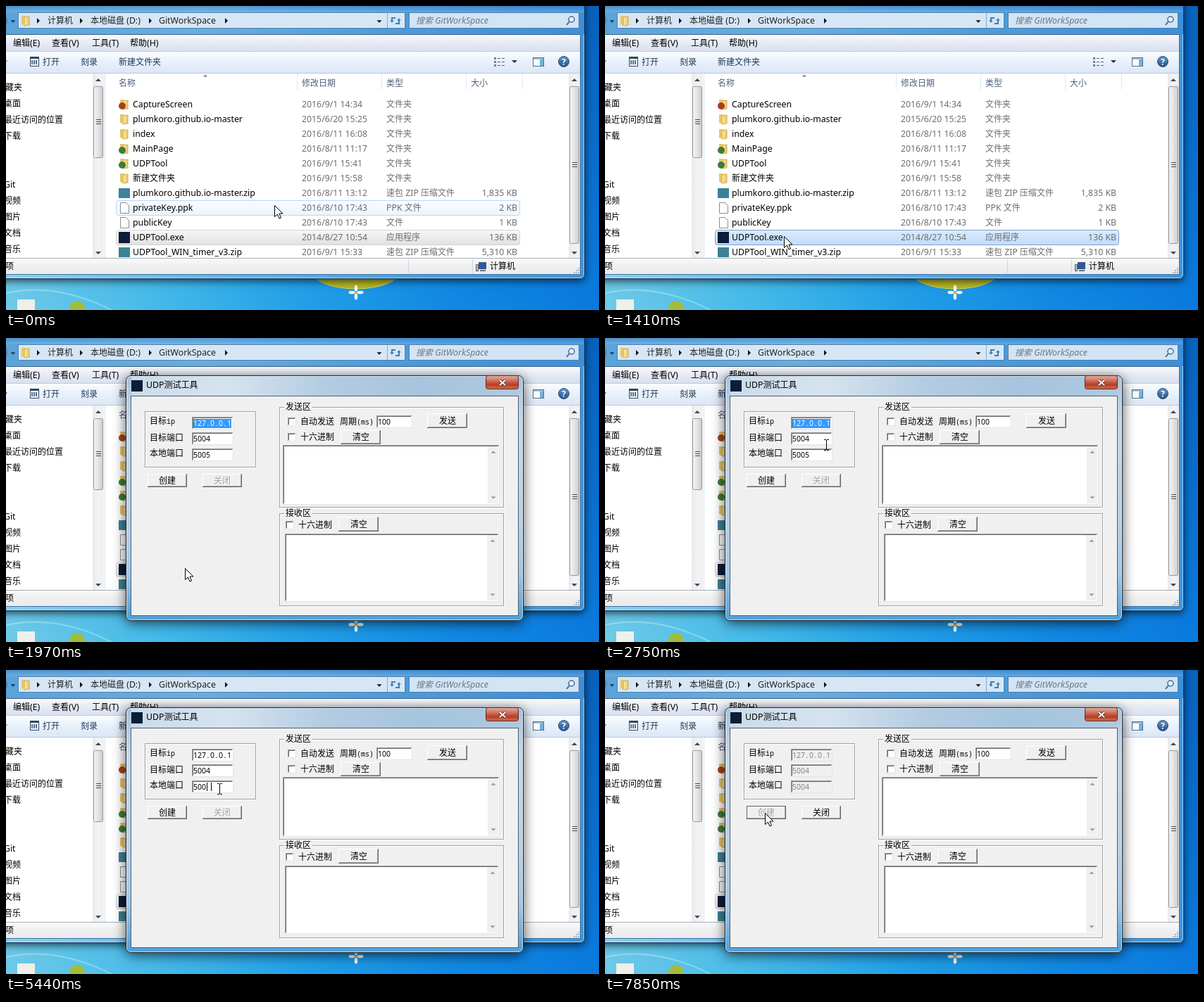
These frames come from a looping animation (842x432 px, 8 s). An HTML page with a canvas:

```html
<!DOCTYPE html>
<html lang="zh">
<head>
<meta charset="utf-8">
<style>
html, body { margin: 0; width: 842px; height: 432px; overflow: hidden; background: #1b86dd; }
canvas { display: block; }
</style>
</head>
<body>
<canvas id="stage" width="842" height="432"></canvas>
<script>
const ctx = document.getElementById('stage').getContext('2d');
const LOOP = 8000, DIALOG_AT = 1970, CREATED_AT = 7850;
const CJK = '"Noto Sans CJK SC", "Noto Sans CJK", sans-serif';

// ---------- drawing helpers ----------
function shade(x0, y0, x1, y1, colors) {
  const g = ctx.createLinearGradient(x0, y0, x1, y1);
  colors.forEach((c, i) => g.addColorStop(i / (colors.length - 1), c));
  return g;
}
const down = (y, h, ...colors) => shade(0, y, 0, y + h, colors);
const across = (x, w, ...colors) => shade(x, 0, x + w, 0, colors);

function rect(x, y, w, h, fill, stroke) {
  if (fill) { ctx.fillStyle = fill; ctx.fillRect(x, y, w, h); }
  if (stroke) { ctx.strokeStyle = stroke; ctx.lineWidth = 1; ctx.strokeRect(x + .5, y + .5, w - 1, h - 1); }
}
function round(x, y, w, h, r, fill, stroke) {
  ctx.beginPath();
  ctx.roundRect(x + .5, y + .5, w - 1, h - 1, r);
  paint(fill, stroke);
}
function paint(fill, stroke, width = 1) {
  if (fill) { ctx.fillStyle = fill; ctx.fill(); }
  if (stroke) { ctx.strokeStyle = stroke; ctx.lineWidth = width; ctx.stroke(); }
}
function shape(points, fill, stroke, width) {
  ctx.beginPath();
  points.forEach(([x, y]) => ctx.lineTo(x, y));
  if (fill) ctx.closePath();
  paint(fill, stroke, width);
}
function ellipse(x, y, rx, ry, fill, stroke, width) {
  ctx.beginPath();
  ctx.ellipse(x, y, rx, ry, 0, 0, 7);
  paint(fill, stroke, width);
}
function arrow(x, y, dir, size, color) {
  const [dx, dy] = { up: [0, -1], down: [0, 1], right: [1, 0] }[dir];
  shape([[x + dx * size / 2, y + dy * size / 2],
         [x - dx * size / 2 + dy * size, y - dy * size / 2 + dx * size],
         [x - dx * size / 2 - dy * size, y - dy * size / 2 - dx * size]], color);
}
// Chinese and Latin runs use their own fonts; y is the middle of the line.
function text(str, x, y, color = '#000', { mono, italic, right } = {}) {
  const latin = mono ? '10px "Noto Sans Mono", monospace' : '12.3px "Noto Sans", sans-serif';
  const runs = str.match(/[\u3000-\u9fff]+|[^\u3000-\u9fff]+/g).map(run => {
    const font = (italic ? 'italic ' : '') + (run > '\u3000' ? '12px ' + CJK : latin);
    ctx.font = font;
    return { run, font, width: ctx.measureText(run).width };
  });
  if (right) x -= runs.reduce((sum, r) => sum + r.width, 0);
  ctx.fillStyle = color;
  for (const { run, font, width } of runs) {
    ctx.font = font;
    ctx.fillText(run, x, y + 4);
    x += width;
  }
}
// Numbers sit in fixed cells, six pixels per character.
function digits(value, x, y, color) {
  ctx.font = '10.5px "Noto Sans", sans-serif';
  ctx.fillStyle = color;
  ctx.textAlign = 'center';
  [...value].forEach((c, i) => ctx.fillText(c, x + 3 + i * 6, y + 4));
  ctx.textAlign = 'left';
}
function withShadow(blur, dy, draw) {
  ctx.save();
  ctx.shadowColor = 'rgba(0,0,0,.7)';
  ctx.shadowBlur = blur;
  ctx.shadowOffsetY = dy;
  draw();
  ctx.restore();
}

// ---------- desktop ----------
function desktop() {
  rect(0, 0, 842, 432, across(0, 842, '#6fcbe9', '#45bbea', '#22a0e8', '#1189e3', '#0a7ade'));
  rect(0, 0, 842, 432, down(0, 432, 'rgba(0,40,110,.3)', 'rgba(0,40,110,0)'));
  ctx.beginPath();
  ctx.moveTo(0, 408);
  ctx.quadraticCurveTo(70, 392, 150, 432);
  paint(null, 'rgba(200,245,240,.4)', 2);
  ellipse(497, 377, 62, 25, '#b5b524', '#d6d24a');
  for (const [dx, dy] of [[0, -6], [0, 6], [-6, 0], [6, 0]])
    ellipse(497 + dx, 407 + dy, dx ? 4.5 : 2.3, dx ? 2.3 : 4.5, '#f6fbf4');
  ellipse(497, 407, 2, 2, '#e5a84c');
  rect(16, 417, 25, 15, '#eef0ea');
  ellipse(101, 430, 11, 11, '#a3bb3c');
}

// ---------- file manager ----------
const files = [
  ['folder', 'CaptureScreen', '2016/9/1 14:34', '文件夹', '', '#a5401c'],
  ['folder', 'plumkoro.github.io-master', '2015/6/20 15:25', '文件夹'],
  ['folder', 'index', '2016/8/11 16:08', '文件夹'],
  ['folder', 'MainPage', '2016/8/11 11:17', '文件夹', '', '#3c7d35'],
  ['folder', 'UDPTool', '2016/9/1 15:41', '文件夹', '', '#3c7d35'],
  ['folder', '新建文件夹', '2016/9/1 15:58', '文件夹'],
  ['zip', 'plumkoro.github.io-master.zip', '2016/8/11 13:12', '速包 ZIP 压缩文件', '1,835 KB'],
  ['page', 'privateKey.ppk', '2016/8/10 17:43', 'PPK 文件', '2 KB'],
  ['page', 'publicKey', '2016/8/10 17:43', '文件', '1 KB'],
  ['app', 'UDPTool.exe', '2014/8/27 10:54', '应用程序', '136 KB'],
  ['zip', 'UDPTool_WIN_timer_v3.zip', '2016/9/1 15:33', '速包 ZIP 压缩文件', '5,310 KB'],
];
const EXE = 9;
const icons = {
  folder(x, y) {
    shape([[x + 2, y - 7], [x + 8, y - 7], [x + 8, y + 7], [x + 2, y + 5]], '#e9c766');
    shape([[x + 6, y - 5], [x + 13, y - 6], [x + 13, y + 6], [x + 6, y + 7]],
          across(x + 5, 9, '#fdf0b5', '#e8c25c'), '#d2ab4e');
  },
  zip: (x, y) => rect(x, y - 7, 16, 14, '#3c8297'),
  page: (x, y) => shape([[x + 2.5, y - 7.5], [x + 10.5, y - 7.5], [x + 14.5, y - 3.5], [x + 14.5, y + 7.5],
                         [x + 2.5, y + 7.5], [x + 2.5, y - 7.5]], '#fdfdfd', '#8d8d8d'),
  app: (x, y) => rect(x, y - 8, 16, 16, '#0b1d38'),
};
const rowStyles = {
  hover: ['#fafdff', '#ebf4fd', '#b8d6fb'],
  selected: ['#dcebfc', '#c1dbfc', '#7da2ce'],
  idle: ['#f8f8f8', '#e0e0e0', '#d4d4d4'],
};
const rowY = i => 140 + 21 * i;

function scrollbar(x, thumbEnd, grip) {
  rect(x, 96, 16, 262, across(x, 16, '#e8e9ec', '#f3f3f4', '#efeff0'));
  arrow(x + 8, 105, 'up', 4, '#404855');
  arrow(x + 8, 351, 'down', 4, '#404855');
  round(x + 1, 114, 14, thumbEnd - 114, 2, across(x, 15, '#f6f6f6', '#e6e6e8', '#c9cacd'), '#979797');
  for (let i = -1; i < 2; i++) rect(x + 5, grip + i * 3, 7, 1, '#4a4a4a');
}

function fileRow(file, i, style) {
  const [kind, name, date, type, size, badge] = file, y = rowY(i);
  if (style) {
    const [top, bottom, edge] = rowStyles[style];
    round(156, y - 11, 574, 22, 3, down(y - 11, 22, top, bottom), edge);
  }
  icons[kind](160, y);
  if (badge) ellipse(165, y + 2, 5, 5, badge);
  text(name, 180, y);
  text(date, 420, y, '#6d6d6d');
  text(type, 540, y, '#6d6d6d');
  if (size) text(size, 726, y, '#6d6d6d', { right: true });
}

function addressBar() {
  rect(0, 0, 821, 40, across(0, 821, '#5aa4da', '#69aee0', '#4c9cdd', '#3a8fdb'));
  rect(0, 0, 821, 9, down(0, 9, 'rgba(30,100,170,.3)', 'rgba(160,205,240,.25)'));
  arrow(10, 22, 'down', 3.5, '#1d3a58');
  ellipse(-3, 21, 5, 9, '#4f83b8');
  rect(17, 9, 550, 23, '#d6e6f5', '#527fa9');
  rect(18, 10, 548, 21, null, '#e6f1fa');
  rect(541, 10, 1, 21, '#8fa9c3');
  icons.folder(20, 21);
  for (const x of [46, 107, 205, 313]) arrow(x, 21, 'right', 4, '#111');
  text('计算机', 59, 21, '#222');
  text('本地磁盘 (D:)', 120, 21, '#222');
  text('GitWorkSpace', 217, 21, '#222');
  arrow(530, 22, 'down', 3.5, '#111');
  shape([[548, 23], [548, 17], [553, 17]], null, '#3480bd', 2);
  shape([[558, 18], [558, 25], [553, 25]], null, '#3480bd', 2);
  arrow(548, 22, 'down', 3, '#3480bd');
  arrow(558, 19, 'up', 3, '#3480bd');
  rect(572, 9, 242, 23, '#d3e4f4', '#527fa9');
  text('搜索 GitWorkSpace', 582, 21, '#6a7886', { italic: true });
  ellipse(803, 19, 4, 4, '#edf5fb', '#3b6c9e', 1.5);
  shape([[800, 22], [796, 27]], null, '#3b6c9e', 2);
}

function bars() {
  rect(0, 40, 815, 1, '#3f6286');
  rect(0, 41, 815, 23, down(41, 23, '#fafbfd', '#e6eaf4', '#d9e0ef'));
  [['编辑(E)', 10], ['查看(V)', 65], ['工具(T)', 122], ['帮助(H)', 176]].forEach(([s, x]) => text(s, x, 53));
  rect(0, 64, 815, 32, down(64, 32, '#fbfdff', '#e8f0fa', '#dbe6f4'));
  rect(0, 64, 815, 1, '#c3cbdc');
  rect(0, 95, 815, 1, '#b9c9dc');
  arrow(-1, 79, 'down', 3, '#1e395b');
  rect(34, 72, 13, 14, '#f8fafc', '#31475f');
  rect(34, 72, 13, 3, '#31475f');
  for (let i = 0; i < 3; i++) rect(36 + i * 3, 77, 2, 6, '#567493');
  [['打开', 52], ['刻录', 106], ['新建文件夹', 160]].forEach(([s, x]) => text(s, x, 80, '#1e395b'));
  for (let i = 0; i < 3; i++) {
    rect(693, 73 + i * 5, 3, 3, '#69829f');
    rect(698, 74 + i * 5, 4, 1, '#53667c');
    rect(704, 74 + i * 5, 4, 1, '#53667c');
  }
  arrow(722, 79, 'down', 4, '#1e395b');
  rect(748, 73, 16, 13, '#fff', '#49718f');
  rect(749, 74, 14, 2, '#9cc2dc');
  rect(758, 76, 5, 9, '#73b1d9');
  ellipse(792, 79, 7.5, 7.5, down(71, 16, '#6c9ad0', '#1f4b8c'), '#33506f');
  ctx.font = 'bold 12px "Noto Sans", sans-serif';
  ctx.fillStyle = '#fff';
  ctx.fillText('?', 789.3, 83.5);
}

function sidebar() {
  text('收藏夹', -13, 116);
  [['桌面', 139], ['最近访问的位置', 162], ['下载', 185], ['视频', 277], ['图片', 300], ['文档', 323], ['音乐', 346]]
    .forEach(([s, y]) => text(s, -3, y));
  text('Git', -3, 254);
  scrollbar(123, 216, 164);
  rect(140, 96, 1, 262, '#d9e3ef');
}

function statusBar() {
  rect(0, 358, 815, 23, down(358, 23, '#fafafa', '#f0f0f0', '#e9ebee'));
  rect(0, 358, 815, 1, '#9fabb8');
  text('项', -1, 370);
  rect(571, 360, 1, 20, '#d0d3d8');
  rect(662, 360, 1, 20, '#d0d3d8');
  rect(671, 364, 11, 10, '#2559b1', '#4a5562');
  rect(667, 367, 4, 10, '#b5bcc6', '#5b6572');
  rect(673, 375, 8, 2, '#68727f');
  text('计算机', 687, 370);
  for (let i = 0; i < 3; i++) for (let j = 0; j <= i; j++) rect(812 - j * 3, 372 + i * 3, 2, 2, '#a9b4c2');
}

function explorer(hovered, exeStyle) {
  withShadow(12, 3, () => round(-20, -20, 842, 408, 6, '#4ba2e4'));
  round(-20, -20, 842, 408, 6, across(0, 822, '#8bd3ee', '#62b9ea', '#48a3e6', '#3f97e0'), '#12365c');
  round(-19, -19, 840, 406, 5, null, 'rgba(200,232,252,.7)');
  addressBar();
  rect(0, 40, 815, 341, '#fff');
  bars();
  sidebar();
  for (const x of [413, 533, 653, 733]) rect(x, 96, 1, 23, '#e2e8ee');
  [['名称', 160], ['修改日期', 420], ['类型', 540], ['大小', 660]].forEach(([s, x]) => text(s, x, 110, '#4c607a'));
  arrow(283, 99, 'up', 3, '#5c87a8');
  files.forEach((file, i) => fileRow(file, i, i === EXE ? exeStyle : i === hovered && 'hover'));
  scrollbar(799, 338, 225);
  statusBar();
  rect(815, 40, 1, 342, '#3f6f9c');
  rect(0, 381, 816, 1, '#3f6f9c');
}

// ---------- dialog ----------
const FIELD_TOPS = [112, 134, 157];
const mono = (s, x, y, color) => text(s, x, y, color, { mono: true });

function sunken(x, y, w, h, fill = '#fff') {
  rect(x, y, w, h, fill, '#e3e3e3');
  rect(x, y, w - 1, 1, '#a0a0a0');
  rect(x, y, 1, h - 1, '#a0a0a0');
  rect(x + 1, y + 1, w - 3, 1, '#696969');
  rect(x + 1, y + 1, 1, h - 3, '#696969');
}
function button(label, x, y, w, h, { disabled, pressed, framed } = {}) {
  rect(x, y, w, h, '#f0f0f0');
  rect(x, y, w, 1, pressed ? '#8a8a8a' : '#fff');
  rect(x, y, 1, h, pressed ? '#8a8a8a' : '#fff');
  rect(x, y + h - 1, w, 1, '#696969');
  rect(x + w - 1, y, 1, h, '#696969');
  rect(x + 1, y + h - 2, w - 2, 1, '#a0a0a0');
  rect(x + w - 2, y + 1, 1, h - 2, '#a0a0a0');
  if (framed) rect(x, y, w, h, null, '#646464');
  const shift = pressed ? 1 : 0;
  const tx = Math.round(x + w / 2 - 12) + shift, ty = Math.round(y + h / 2) + shift;
  if (disabled) text(label, tx + 1, ty + 1, '#fff');
  text(label, tx, ty, disabled ? '#a0a0a0' : '#000');
}
function group(x, y, w, h, label) {
  rect(x + 1, y + 1, w, h, null, '#fff');
  rect(x, y, w, h, null, '#a0a0a0');
  if (label) {
    rect(x + 7, y - 5, 40, 11, '#f0f0f0');
    text(label, x + 9, y);
  }
}
function checkbox(label, x, y) {
  sunken(x, y, 12, 12);
  text(label, x + 18, y + 6);
}
function textArea(x, y, w, h) {
  sunken(x, y, w, h);
  rect(x + w - 17, y + 2, 15, h - 4, '#f0f0f0');
  arrow(x + w - 9, y + 10, 'up', 3.5, '#9b9b9b');
  arrow(x + w - 9, y + h - 10, 'down', 3.5, '#9b9b9b');
}

function connection(t) {
  const created = t >= CREATED_AT, fresh = t < 3720;
  const port = t < 5440 ? '5005' : t < 6430 ? '500' : '5004';
  const ink = created ? '#848484' : '#000';
  group(197, 104, 158, 80);
  ['目标ip', '目标端口', '本地端口'].forEach((s, i) => mono(s, 204, [118, 142, 164][i]));
  ['127.0.0.1', '5004', port].forEach((value, i) => {
    const y = FIELD_TOPS[i], marked = i === 0 && fresh;
    sunken(264, y, 59, 18, created ? '#f0f0f0' : '#fff');
    if (marked) rect(266, y + 3, 54, 13, '#3399ff');
    digits(value, 266, y + 9, marked ? '#fff' : ink);
  });
  // The caret leaves its earlier position on screen while the digit is replaced.
  if (!fresh && !created) {
    rect(291, 160, 1, 12, '#000');
    if (t >= 5440) rect(285, 160, 1, 12, '#000');
  }
  button('创建', 201, 193, 56, 19, { disabled: created, pressed: t >= 7670 && !created, framed: t >= 7670 });
  button('关闭', 279, 193, 56, 19, { disabled: !created });
}

function dialog(t) {
  withShadow(18, 3, () => round(170, 53, 565, 349, 7, '#a5c2dc'));
  round(170, 53, 565, 349, 7, down(53, 349, '#a9c2da', '#c6d8e8', '#bfd4e6', '#b6d0e6', '#a5c8e4', '#4f9fd8'), '#1c2732');
  rect(178, 55, 548, 27, across(178, 548, '#cbdbe9', '#d5e3ef', '#b4cce2', '#a6c4de', '#aec9e0'));
  round(171, 54, 563, 347, 6, null, 'rgba(235,245,252,.7)');
  icons.app(178, 68);
  text('UDP测试工具', 199, 67);
  round(681, 53, 47, 20, 3, down(53, 20, '#e5b0a2', '#d27a66', '#b73d22', '#cf7558'), '#5c2b26');
  for (const [color, width] of [['#5b3b3b', 4], ['#fff', 2]]) {
    shape([[701, 60], [709, 67]], null, color, width);
    shape([[709, 60], [701, 67]], null, color, width);
  }
  rect(177, 82, 551, 313, '#f0f0f0', '#4b6074');
  connection(t);

  group(388, 98, 319, 143, '发送区');
  checkbox('自动发送', 400, 113);
  mono('周期(ms)', 474, 119);
  sunken(526, 110, 51, 18);
  digits('100', 528, 119, '#000');
  button('发送', 598, 107, 57, 21);
  checkbox('十六进制', 400, 135);
  button('清空', 475, 131, 57, 20);
  textArea(393, 152, 308, 85);

  group(388, 249, 319, 132, '接收区');
  checkbox('十六进制', 397, 260);
  button('清空', 472, 254, 57, 21);
  textArea(396, 278, 304, 97);
}

// ---------- pointer ----------
const moves = [
  { start: 260, end: 880, steps: 9, path: [[381, 283], [325, 305], [254, 327]] },
  { start: 2190, end: 2750, steps: 8, path: [[254, 327], [282, 235], [311, 123], [314, 151]] },
  { start: 3030, end: 3420, steps: 6, path: [[314, 151], [289, 163], [303, 168]] },
  { start: 6750, end: 6900, steps: 3, path: [[303, 168], [314, 167]] },
  { start: 7060, end: 7370, steps: 5, path: [[314, 167], [227, 203]] },
];
// The pointer advances in discrete steps along the latest path.
function pointerAt(t) {
  const move = moves.findLast(m => t >= m.start);
  if (!move) return moves[0].path[0];
  const { start, end, steps, path } = move;
  const step = Math.min(steps, 1 + Math.floor((t - start) / (end - start) * (steps - 1) + 1e-6));
  const along = step / steps * (path.length - 1);
  const i = Math.min(path.length - 2, Math.floor(along));
  return path[i].map((v, axis) => Math.round(v + (path[i + 1][axis] - v) * (along - i)));
}
function pointer(t, [x, y]) {
  if (t >= 6430 && t < 6750) return;
  const overField = t >= DIALOG_AT && x > 263 && x < 323 && FIELD_TOPS.some(top => y >= top && y < top + 18);
  if (overField) {
    rect(x, y - 6, 1, 14, '#000');
    for (const edge of [y - 7, y + 8]) {
      rect(x - 3, edge, 3, 1, '#000');
      rect(x + 1, edge, 3, 1, '#000');
    }
  } else {
    shape([[0, 0], [0, 16], [4, 12.5], [6.5, 18.5], [9, 17.5], [6.5, 11.5], [11.5, 11.5], [0, 0]]
      .map(([dx, dy]) => [x + .5 + dx, y + .5 + dy]), '#fff', '#000');
  }
}

function draw(now) {
  const t = now % LOOP, open = t >= DIALOG_AT, at = pointerAt(t);
  const hovered = open ? -1 : Math.round((at[1] - 140) / 21);
  desktop();
  explorer(hovered, !open && hovered === EXE ? 'selected' : 'idle');
  if (open) dialog(t);
  pointer(t, at);
}
const begin = performance.now();
function frame() {
  draw(performance.now() - begin);
  requestAnimationFrame(frame);
}
frame();
</script>
</body>
</html>
```
